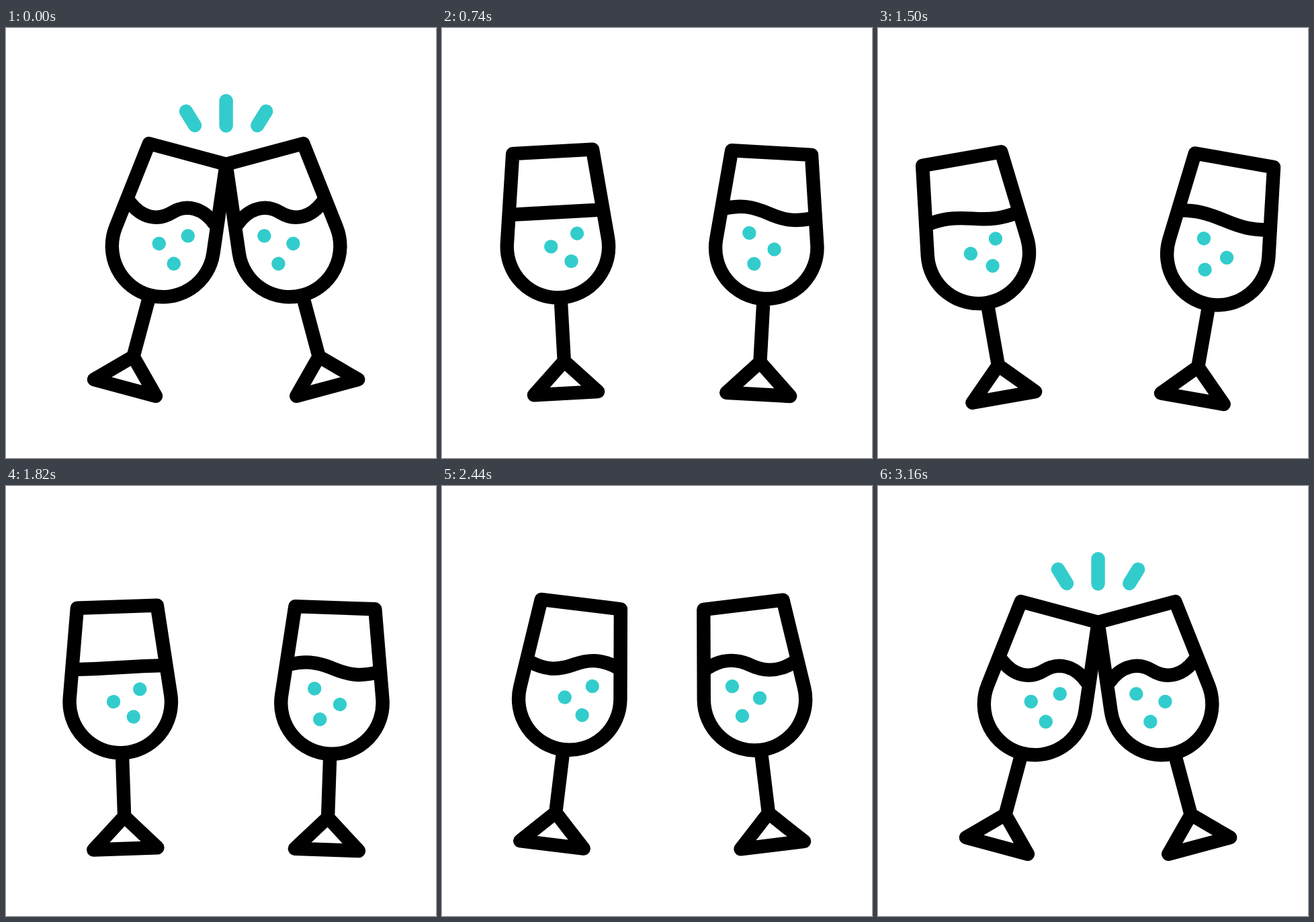
Write an HTML page that moves like this. It is 640 px wide and 640 px high and loops after 3380 ms.

```html
<!DOCTYPE html>
<html lang="en">
<head>
<meta charset="utf-8">
<title>Cheers</title>
<style>
  html, body { margin: 0; width: 100%; height: 100%; overflow: hidden; background: #fff; }
  svg { display: block; width: 100vw; height: 100vh; }
  g { fill: none; stroke: #000; stroke-width: 20.4; stroke-linecap: round; stroke-linejoin: round; }
  circle { fill: #3cc; stroke: none; }
  .sparks { stroke: #3cc; }
</style>
</head>
<body>
<svg viewBox="0 0 640 640">
  <g class="sparks"><path/><path/><path/></g>
  <g id="left"></g>
  <g transform="translate(655.2) scale(-1 1)"><g id="right"></g></g>
</svg>
<script>
const LOOP = 3380, STEP = 20;

const clamp = v => Math.min(1, Math.max(0, v));
const smooth = u => u * u * (3 - 2 * u);
const swing = u => 1 - (1 - u ** 1.4) ** 3;
const rush = u => u ** 1.6;

// x, y: middle of the foot; drift: shift of the bubbles; left, right: wave heights
const TOUCH = { tilt: 15, x: 177, y: 535.5, drift: 0, left: 14, right: 14 };
const APART = { tilt: -10, x: 187.3, y: 549.5, drift: 1, left: -5.3, right: 5 };
const RAISED = { tilt: 9.7, x: 164, y: 525.8, drift: .38, left: 9.5, right: 11 };
const LOWERED = { tilt: 4.8, x: 163, y: 540, drift: 0, left: 9, right: 10 };

// lag stretches the vertical part of a move
const MOVES = [
  { from: TOUCH, to: APART, start: 210, span: 1120, ease: swing, lag: 1.25 },
  { from: APART, to: RAISED, start: 1540, span: 640, ease: smooth, lag: 1 },
  { from: RAISED, to: LOWERED, start: 2200, span: 440, ease: smooth, lag: 1 },
  { from: LOWERED, to: TOUCH, start: 2640, span: 520, ease: rush, lag: 1 }
];

function poseAt(t) {
  const pose = { ...TOUCH };
  for (const { from, to, start, span, ease, lag } of MOVES)
    for (const k in pose) {
      const u = clamp((t - start) / (k === 'y' ? span * lag : span));
      pose[k] += (to[k] - from[k]) * ease(u);
    }
  return pose;
}

// Glass drawn upright with the middle of the rim at 0,0
const FOOT = 360.4;
const GLASS = `<path d="M-59.5 0H59.5L75.2 133.3A75.7 75.7 0 1 1 -75.2 133.3Z
  M0 218V312.3L47.6 ${FOOT}H-47.6L0 312.3"/><path class="wave"/>` + '<circle r="10.2"/>'.repeat(3);
const BUBBLES = [[-6.5, 140], [32.1, 117.7], [22.5, 163.2]];

function wavePath(height) {
  const mid = 90.5, bend = height * 1.34;
  const end = height * (14 - Math.abs(height)) / 14;
  const near = 36 - 1.3 * Math.abs(height);
  return `M-66 ${mid + end}C-43 ${mid + bend} ${-near} ${mid + bend} 0 ${mid}
    S43 ${mid - bend} 66 ${mid - end}`;
}

function makeGlass(id, shifts) {
  const g = document.getElementById(id);
  g.innerHTML = GLASS;
  const wave = g.querySelector('.wave'), dots = g.querySelectorAll('circle');
  return ({ tilt, x, drift, [id]: height }, y) => {
    g.setAttribute('transform', `translate(${x} ${y}) rotate(${tilt}) translate(0 ${-FOOT})`);
    wave.setAttribute('d', wavePath(height));
    dots.forEach((dot, i) => {
      const [dx, dy] = shifts[i % shifts.length];
      dot.setAttribute('cx', BUBBLES[i][0] + drift * dx);
      dot.setAttribute('cy', BUBBLES[i][1] + drift * dy);
    });
  };
}

const drawLeft = makeGlass('left', [[-5, 1.5], [-3.3, 8.2], [-5, 1.8]]);
const drawRight = makeGlass('right', [[-7.5, 4.8]]);

// Each spark is a line from an inner to an outer end
const SPARKS = [
  [[327.6, 145.5], [327.6, 108.5]],
  [[281, 145], [268, 124]],
  [[374.2, 145], [387.2, 124]]
];
const sparkPaths = document.querySelectorAll('.sparks path');

// Sparks shrink outwards after the touch and grow back before the next one
function drawSparks(t) {
  const leave = clamp((t - 210) / 200), grow = clamp((t - 3040) / 120);
  const [tail, head] = grow > 0 ? [0, grow] : [leave * 1.33, 1 + leave * .33];
  SPARKS.forEach(([a, b], i) => {
    const at = p => a.map((v, j) => v + (b[j] - v) * p).join(' ');
    sparkPaths[i].setAttribute('d', head - tail > .01 ? `M${at(tail)}L${at(head)}` : '');
  });
}

function draw(t) {
  const pose = poseAt(t);
  drawLeft(pose, pose.y);
  drawRight(pose, pose.y + (TOUCH.tilt - pose.tilt) * .09);
  drawSparks(t);
}

const start = performance.now();
function tick() {
  const t = (performance.now() - start) % LOOP;
  draw(Math.floor(t / STEP) * STEP);
  requestAnimationFrame(tick);
}
tick();
</script>
</body>
</html>
```
